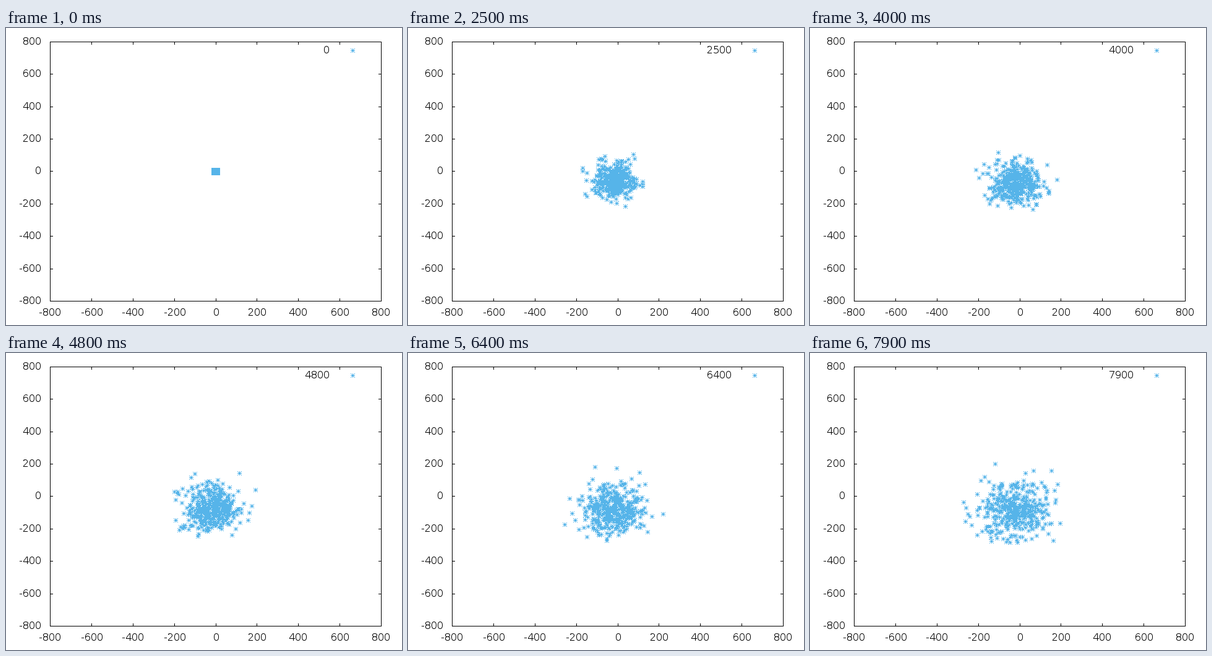
Write a matplotlib script that moves like this. It is 640 px wide and 480 px high and loops after 8000 ms.

```python
import numpy as np
import matplotlib.pyplot as plt
from matplotlib.animation import FuncAnimation
from matplotlib.collections import LineCollection, PathCollection
from matplotlib.path import Path
from matplotlib.transforms import IdentityTransform

W, H, DPI = 640, 480, 100
PX = 72 / DPI
FRAMES, SIDE, STEP = 80, 20, 10.0
LEFT, RIGHT, TOP, BOTTOM = 71, 606, 22, 441
TICK = 4
BLUE = "#56b4e9"

plt.rcParams.update({
    "font.family": "DejaVu Sans",
    "font.size": 16 * PX,
    "text.hinting": "default",
    "text.hinting_factor": 1,
})


def to_px(pts):
    """Plot units (-800..800) to stage pixels."""
    sx, sy = (RIGHT - LEFT) / 1600, (BOTTOM - TOP) / 1600
    return np.stack([LEFT + (pts[..., 0] + 800) * sx,
                     BOTTOM - (pts[..., 1] + 800) * sy], axis=-1)


def swarm(seed):
    """Random walkers that leave a small square while their mean sinks."""
    rng = np.random.default_rng(seed)
    side = np.linspace(-10, 10, SIDE)
    grid = np.stack(np.meshgrid(side, side), axis=-1).reshape(-1, 1, 2)

    steps = rng.normal(0, STEP, (SIDE * SIDE, FRAMES, 2))
    steps[:, 0] = 0
    t = np.arange(FRAMES) / 10
    drift = np.stack([-28 * (1 - np.exp(-t / 3)),
                      -90 * (1 - np.exp(-t / 2.2))], axis=-1)
    return np.rint(to_px(grid + steps.cumsum(axis=1) + drift))


def star_path(r=3):
    """A crisp asterisk built from whole pixels."""
    square = np.array([(0, 0), (1, 0), (1, 1), (0, 1), (0, 0)]) - 0.5
    span = range(-r, r + 1)
    cells = [square + (x, y) for x in span for y in span
             if x == 0 or y == 0 or abs(x) == abs(y)]
    codes = [Path.MOVETO] + [Path.LINETO] * 3 + [Path.CLOSEPOLY]
    return Path(np.concatenate(cells), codes * len(cells))


def add_stars(centres):
    stars = PathCollection([star_path()], offsets=centres + 0.5,
                           offset_transform=ax.transData,
                           facecolors=BLUE, linewidths=0)
    stars.set_transform(IdentityTransform())
    stars.set_snap(False)
    ax.add_collection(stars, autolim=False)
    return stars


fig = plt.figure(figsize=(W / DPI, H / DPI), dpi=DPI, facecolor="white")
ax = fig.add_axes([0, 0, 1, 1])
ax.set_xlim(0, W)
ax.set_ylim(H, 0)
ax.axis("off")

paths = swarm(12)
dots = add_stars(paths[:, 0])
add_stars(np.array([(560, 36)]))

edges = [[(LEFT, TOP), (RIGHT, TOP)], [(LEFT, BOTTOM), (RIGHT, BOTTOM)],
         [(LEFT, TOP), (LEFT, BOTTOM)], [(RIGHT, TOP), (RIGHT, BOTTOM)]]
for value in range(-800, 801, 200):
    x, y = to_px(np.array([value, value], dtype=float))
    tx, ty = np.floor(x + 0.5), np.floor(y + 0.49)
    edges += [[(tx, TOP), (tx, TOP + TICK)], [(tx, BOTTOM - TICK), (tx, BOTTOM)],
              [(LEFT, ty), (LEFT + TICK, ty)], [(RIGHT - TICK, ty), (RIGHT, ty)]]
    ax.text(tx + 0.5, 465, str(value), ha="center", va="baseline")
    ax.text(57.5, ty + 5, str(value), ha="right", va="baseline")

frame = LineCollection(np.array(edges, dtype=float) + 0.5, colors="black",
                       linewidths=PX, antialiaseds=False, capstyle="projecting")
frame.set_snap(False)
ax.add_collection(frame, autolim=False)

counter = ax.text(523, 41, "0", ha="right", va="baseline")


def draw(i):
    dots.set_offsets(paths[:, i] + 0.5)
    counter.set_text(str(100 * i))
    return dots, counter


anim = FuncAnimation(fig, draw, frames=FRAMES, interval=100, repeat=True,
                     repeat_delay=0, blit=False)
plt.show()
```
